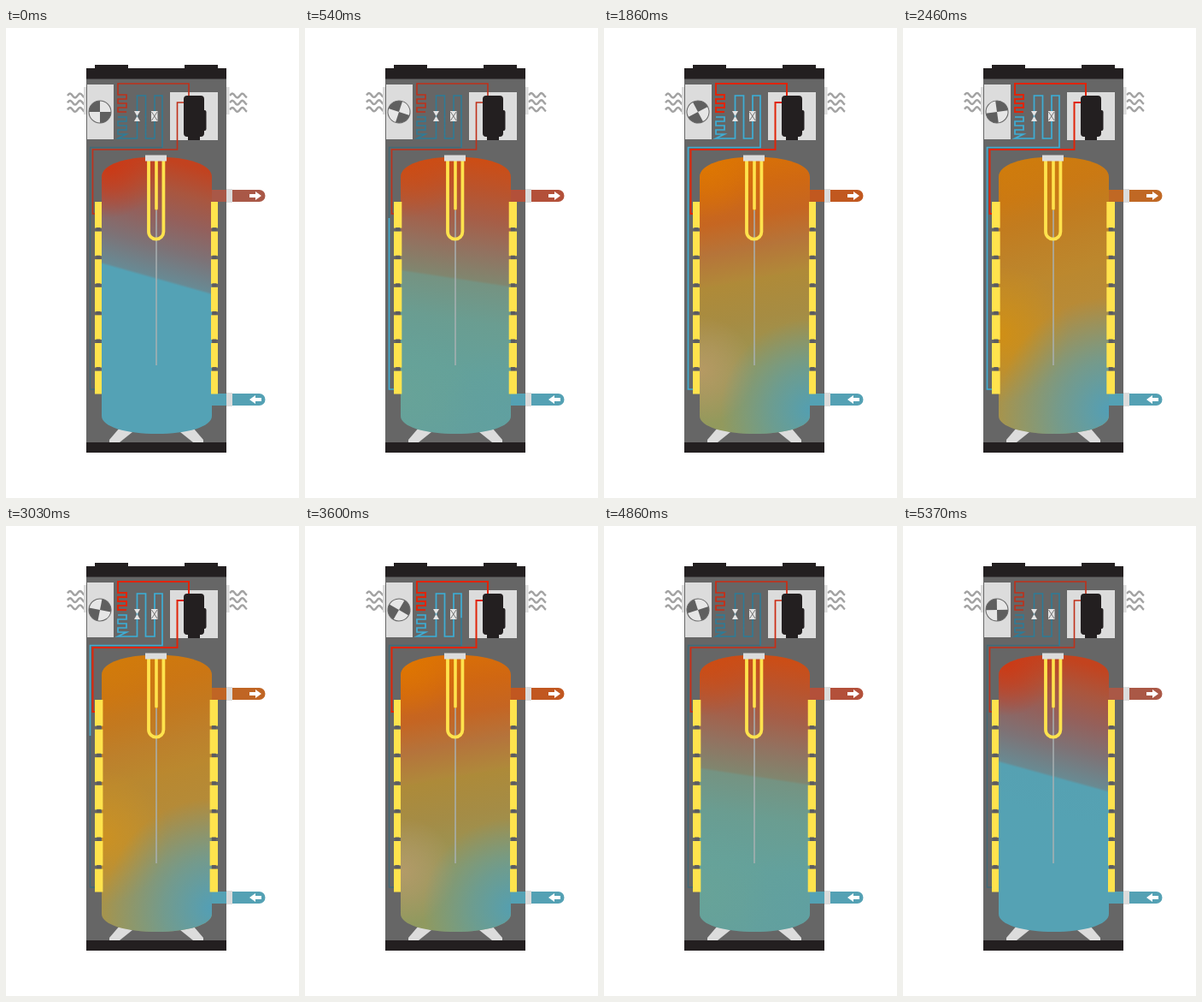
An HTML page with a canvas that plays this animation: 343 px wide and 549 px high, repeating every 5.4 s.

```html
<!DOCTYPE html>
<html lang="en">
<head>
<meta charset="utf-8">
<title>Heat pump water heater</title>
<style>
html, body { margin: 0; width: 100%; height: 100%; overflow: hidden; background: #fff; }
canvas { display: block; width: 343px; height: 549px; }
</style>
</head>
<body>
<canvas id="stage"></canvas>
<script>
const W = 343, H = 549, LOOP = 5400;
const canvas = document.getElementById('stage');
const ctx = canvas.getContext('2d');
const dpr = window.devicePixelRatio || 1;
canvas.width = W * dpr;
canvas.height = H * dpr;

const BLACK = '#231f20', CASE = '#666666', LIGHT = '#dcdcdc', YELLOW = '#ffe34d';
const COLD = '#54a1b4', MID = 176;

// Depths of the tank colour stops; each state lists one colour per depth.
const DEPTHS = [150, 185, 220, 255, 291, 294, 340, 400, 474];
const STATES = [
  { at: 0, tilt: 0.28, pipe: '#a95847',
    stops: '#c2421f #a9563f #93605c #7d7276 #688a94 #54a2b5 #54a2b5 #54a2b5 #54a2b5',
    top: ['#d03510', 0.9], left: ['#54a2b5', 0, 430, 80], right: ['#54a2b5', 0, 60] },
  { at: 1000, tilt: 0.04, pipe: '#bc4a2e',
    stops: '#d4560c #c6521d #b75c35 #a5714c #94824f #918656 #7d9972 #72a084 #6f9f88',
    top: ['#d65a08', 0.4], left: ['#80a878', 0.9, 430, 80], right: ['#619c9c', 0.7, 100] },
  { at: 1830, tilt: -0.18, pipe: '#c1571f',
    stops: '#d97007 #d06812 #c66521 #b6733a #b0883a #ae8a38 #a58c44 #979758 #8f9a60',
    top: ['#e07800', 0.8], left: ['#b79b69', 0.9, 402, 62], right: ['#539fb2', 1, 105] },
  { at: 2540, tilt: -0.3, pipe: '#c06a25',
    stops: '#cc7c0f #c97b14 #c27f1f #bf8426 #bd882c #bd882e #b98b36 #ad9145 #a5954f',
    top: ['#cf7d0c', 0.4], left: ['#d38e0b', 1, 352, 82], right: ['#529fb8', 1, 135] }
];
STATES.forEach(s => { s.stops = s.stops.split(' '); });

const RED_LINES = [
  [[214, 80], [214, 65], [131, 65], [131, 78], ...coil(78, 98)],
  [[208, 87], [200.5, 87], [200.5, 142], [101.5, 142], [101.5, 217], [105, 217]]
];
// Listed in flow order, from the jacket back to the exchanger.
const BLUE_LINE = [
  [105, 422], [98.5, 422], [98.5, 139.5], [183, 139.5], [183, 79], [174, 79],
  [174, 129], [163.5, 129], [163.5, 79], [153.5, 79], [153.5, 129], [131, 129],
  ...coil(104, 124).reverse()
];
const JACKET_LEN = 6.5 + 282.5 + 84.5;
const BLUE_LEN = lineLength(BLUE_LINE);

function coil(from, to) {
  const pts = [];
  for (let y = from, i = 0; y <= to; y += 5, i++) {
    pts.push(i % 2 ? [141, y] : [131, y], i % 2 ? [131, y] : [141, y]);
  }
  return pts;
}

function lineLength(pts) {
  let sum = 0;
  for (let i = 1; i < pts.length; i++) {
    sum += Math.hypot(pts[i][0] - pts[i - 1][0], pts[i][1] - pts[i - 1][1]);
  }
  return sum;
}

const clamp = v => Math.max(0, Math.min(1, v));
const ramp = (t, from, to) => clamp((t - from) / (to - from));
const lerp = (a, b, k) => a + (b - a) * k;
const rgb = hex => [1, 3, 5].map(i => parseInt(hex.substr(i, 2), 16));

function mix(a, b, k, alpha = 1) {
  const p = rgb(a), q = rgb(b);
  return `rgba(${p.map((v, i) => Math.round(lerp(v, q[i], k))).join(',')},${alpha})`;
}

function rect(x, y, w, h, fill) {
  ctx.fillStyle = fill;
  ctx.fillRect(x, y, w, h);
}

function poly(pts, fill) {
  ctx.beginPath();
  pts.forEach(p => ctx.lineTo(p[0], p[1]));
  ctx.closePath();
  ctx.fillStyle = fill;
  ctx.fill();
}

function line(pts, color, width) {
  ctx.beginPath();
  pts.forEach(p => ctx.lineTo(p[0], p[1]));
  ctx.strokeStyle = color;
  ctx.lineWidth = width;
  ctx.stroke();
}

function drawCase() {
  rect(104, 43, 39, 5, BLACK);
  rect(209, 43, 39, 5, BLACK);
  rect(94, 47, 164, 449, CASE);
  rect(94, 47, 164, 12.5, BLACK);
  rect(94, 484, 164, 12, BLACK);
  rect(91, 69, 3, 32, LIGHT);
  rect(258, 69, 3.5, 32, LIGHT);
}

function drawWaves(shift) {
  for (const x0 of [72, 262]) {
    for (let row = 0; row < 3; row++) {
      const pts = [];
      for (let x = 0; x <= 20; x++) {
        pts.push([x0 + x, 79 + row * 8.2 - shift - 2.4 * Math.sin(x / 20 * Math.PI * 3.4)]);
      }
      line(pts, '#a2a2a2', 2.4);
    }
  }
}

function drawFan(angle) {
  rect(95, 66, 31, 64, LIGHT);
  ctx.save();
  ctx.translate(110, 98);
  ctx.rotate(angle);
  ctx.beginPath();
  ctx.arc(0, 0, 13.2, 0, Math.PI * 2);
  ctx.fillStyle = '#e6e6e6';
  ctx.fill();
  ctx.fillStyle = '#5f5f5f';
  for (const start of [0, Math.PI]) {
    ctx.beginPath();
    ctx.moveTo(0, 0);
    ctx.arc(0, 0, 13, start, start + Math.PI / 2);
    ctx.fill();
  }
  ctx.beginPath();
  ctx.arc(0, 0, 13, 0, Math.PI * 2);
  ctx.strokeStyle = '#666';
  ctx.lineWidth = 1;
  ctx.stroke();
  ctx.restore();
}

function drawBlue(t) {
  line(BLUE_LINE.slice(0, 4), '#3f6a78', 1.3);
  line(BLUE_LINE.slice(3), '#2c7c98', 1.5);
  const head = ramp(t, 20, 1830) * BLUE_LEN;
  const tail = ramp(t, 2560, 4400) * BLUE_LEN;
  if (head <= tail) return;
  ctx.setLineDash([0, tail, head - tail, BLUE_LEN * 2]);
  line(BLUE_LINE, '#45acd0', 1.7);
  ctx.setLineDash([]);
}

function drawRed(t) {
  const glow = ramp(t, 1740, 1850) * (1 - ramp(t, 4400, 5100));
  const color = mix('#c0301a', '#e02408', glow);
  RED_LINES.forEach(pts => line(pts, color, lerp(1.6, 2, glow)));
}

function drawParts() {
  poly([[150, 97], [157, 97], [150, 109], [157, 109]], '#e4e4e4');
  rect(170, 97, 7.5, 12, '#e4e4e4');
  line([[170.5, 98], [177, 108]], '#777', 1);
  line([[177, 98], [170.5, 108]], '#777', 1);
}

function drawCompressor() {
  ctx.fillStyle = BLACK;
  ctx.beginPath();
  ctx.roundRect(208, 79, 24, 48, 4);
  ctx.roundRect(222, 96, 12.5, 24, 2);
  ctx.fill();
  rect(213, 126, 14, 5, BLACK);
}

function drawPort(y, color, dir) {
  ctx.fillStyle = color;
  ctx.beginPath();
  ctx.roundRect(238, y, 65.5, 14, [0, 7, 7, 0]);
  ctx.fill();
  rect(258, y - 1, 7, 16, LIGHT);
  const c = 292, m = y + 7;
  poly([[-7, -2], [0, -2], [0, -5], [7, 0], [0, 5], [0, 2], [-7, 2]]
    .map(p => [c + p[0] * dir, m + p[1]]), '#fff');
}

function glowSpot(x, y, r, a, b, k) {
  const alpha = lerp(a[1], b[1], k);
  const g = ctx.createRadialGradient(x, y, 0, x, y, r);
  g.addColorStop(0, mix(a[0], b[0], k, alpha));
  g.addColorStop(0.45, mix(a[0], b[0], k, alpha * 0.6));
  g.addColorStop(1, mix(a[0], b[0], k, 0));
  rect(112, 150, 129, 324, g);
}

function drawTank(a, b, k) {
  for (const s of [-1, 1]) {
    poly([[55, 484], [55, 481], [43, 467], [28, 472], [43, 484]]
      .map(p => [MID + s * p[0], p[1]]), LIGHT);
  }
  ctx.save();
  ctx.beginPath();
  ctx.moveTo(112, 174);
  ctx.bezierCurveTo(112, 159, 141, 150.5, 176.5, 150.5);
  ctx.bezierCurveTo(212, 150.5, 241, 159, 241, 174);
  ctx.lineTo(241, 453);
  ctx.bezierCurveTo(241, 466, 212, 474, 176.5, 474);
  ctx.bezierCurveTo(141, 474, 112, 466, 112, 453);
  ctx.closePath();
  ctx.clip();

  // Scaled so that the colours at the tank axis keep their depths.
  const tilt = lerp(a.tilt, b.tilt, k), n = 1 + tilt * tilt;
  const g = ctx.createLinearGradient(MID, 150, MID - 324 * tilt / n, 150 + 324 / n);
  DEPTHS.forEach((y, i) => g.addColorStop((y - 150) / 324, mix(a.stops[i], b.stops[i], k)));
  rect(112, 150, 129, 324, g);

  glowSpot(120, 160, 62, a.top, b.top, k);
  glowSpot(114, lerp(a.left[2], b.left[2], k), lerp(a.left[3], b.left[3], k), a.left, b.left, k);
  glowSpot(243, 446, lerp(a.right[2], b.right[2], k), a.right, b.right, k);
  ctx.restore();
}

function drawJacket(grow) {
  const w = 8 + grow;
  for (const x of [104, 248 - w]) {
    for (let i = 0; i < 7; i++) {
      const y = i ? 203 + i * 32.6 + 2 : 203;
      const end = i < 6 ? 203 + (i + 1) * 32.6 - 2 : 427.5;
      rect(x, y, w, end - y, YELLOW);
      if (i < 6) rect(x + w / 2 - 2.5, end - 0.5, 5, 5, '#5b5b60');
    }
  }
}

function drawElement() {
  line([[MID, 213], [MID, 394]], '#a9b1b2', 1.5);
  ctx.strokeStyle = YELLOW;
  ctx.lineWidth = 3.8;
  ctx.beginPath();
  ctx.moveTo(167, 154);
  ctx.lineTo(167, 238);
  ctx.arc(175.7, 238, 8.7, Math.PI, 0, true);
  ctx.lineTo(184.4, 154);
  ctx.stroke();
  ctx.lineCap = 'round';
  line([[MID, 154], [MID, 211]], YELLOW, 3.6);
  ctx.lineCap = 'butt';
  rect(163, 148.5, 25, 7, LIGHT);
}

function draw(t) {
  const heat = Math.min(t, LOOP - t);
  let i = 0;
  while (i < STATES.length - 2 && heat > STATES[i + 1].at) i++;
  const a = STATES[i], b = STATES[i + 1], k = ramp(heat, a.at, b.at);
  const pulse = (1 - Math.cos(t / 1800 * Math.PI * 2)) / 2;

  ctx.setTransform(dpr, 0, 0, dpr, 0, 0);
  rect(0, 0, W, H, '#fff');
  drawWaves(pulse * 0.8);
  drawCase();
  drawFan(t / LOOP * Math.PI + Math.PI);
  rect(192, 75, 56, 56, LIGHT);
  drawBlue(t);
  drawRed(t);
  drawParts();
  drawCompressor();
  drawPort(189, mix(a.pipe, b.pipe, k), 1);
  drawPort(427, COLD, -1);
  drawTank(a, b, k);
  drawJacket(pulse * 2);
  drawElement();
}

const start = performance.now();
function tick() {
  draw((performance.now() - start) % LOOP);
  requestAnimationFrame(tick);
}
tick();
</script>
</body>
</html>
```
